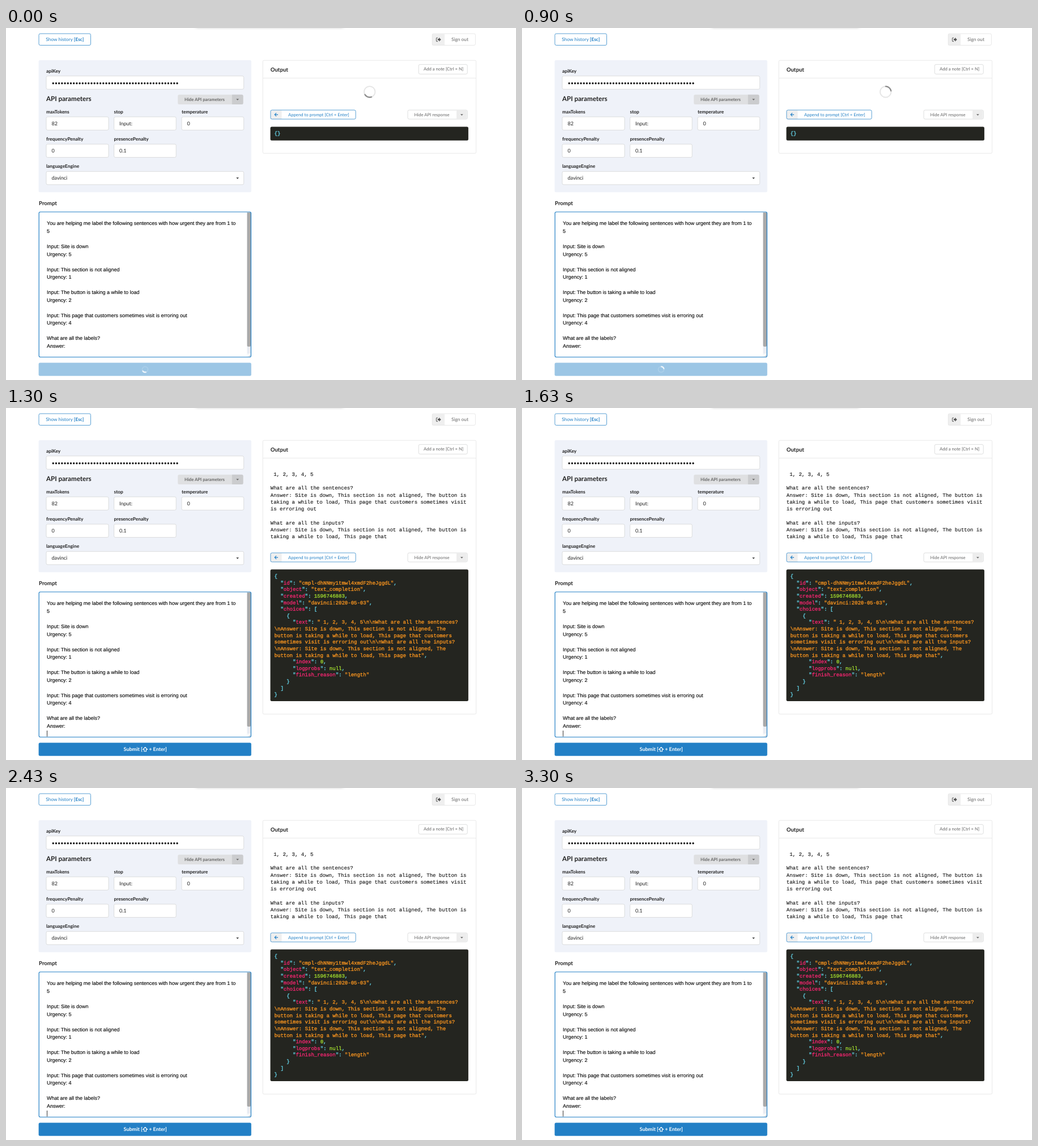
An HTML page that plays this animation: 900 by 622 pixels, repeating every 3370 ms.

```html
<!DOCTYPE html>
<html lang="en">
<head>
<meta charset="utf-8">
<title>Prompt playground</title>
<style>
  :root { --blue: #2380c6; --line: #d2d3d3; --loop: 3370ms; }
  html, body { margin: 0; width: 900px; height: 622px; overflow: hidden; background: #fff; }
  body { position: relative; text-rendering: geometricPrecision; }
  svg { position: absolute; left: 0; top: 0; }
  text { font: 9px Lato, sans-serif; fill: #212121; white-space: pre; }
  .bold { font-weight: 700; }
  .label text { font-size: 8.36px; font-weight: 700; }
  .head { font-size: 9.64px; font-weight: 700; }
  .small { font-size: 8.36px; }
  .tiny { font-size: 7.71px; }
  .grey { fill: #666; }
  .blue { fill: var(--blue); }
  .white { fill: #fff; }
  .box { fill: #fff; stroke: var(--line); stroke-width: .75; }
  .card { fill: none; stroke: #e2e3e3; stroke-width: .8; }
  .edge { fill: none; stroke: var(--blue); stroke-width: .75; }
  .dark { fill: #242520; }

  pre { position: absolute; margin: 0; -webkit-text-stroke: .12px currentColor; }
  #prompt { left: 72px; top: 339.4px; font: 9px/13.53px "Liberation Sans", Arial, sans-serif; color: #000; }
  #answer { left: 466.8px; top: 111.9px; font: 9px/12.28px "Liberation Mono", monospace; color: #111; }
  #json, #empty { left: 473.6px; font: 9px/11.61px "Liberation Mono", monospace; color: #66d9ef;
                  -webkit-text-stroke-width: .3px; }
  #json { top: 293.2px; }
  #empty { top: 182.3px; }
  #json b { font-weight: 400; color: #f92672; }
  #json i { font-style: normal; color: #fd971f; }
  #json u { text-decoration: none; color: #a6e22e; }

  .shade { position: absolute; left: 334px; top: -10px; width: 262px; height: 9px;
           border-radius: 4px; box-shadow: 0 0 5px rgba(0, 0, 0, .28); }

  .wait, .done, .bar, .submit, .caret { animation: var(--loop) step-end infinite; }
  .wait { animation-name: wait; }
  .done { animation-name: done; }
  .bar { animation-name: drop; }
  .submit { animation-name: wake; }
  .caret { animation-name: blink; }
  .spin { animation: spin var(--loop) infinite; }

  @keyframes wait { 0% { visibility: visible } 28.45%, to { visibility: hidden } }
  @keyframes done { 0% { visibility: hidden } 28.45%, to { visibility: visible } }
  @keyframes drop { 0% { transform: none } 28.45%, to { transform: translateY(111px) } }
  @keyframes wake { 0% { opacity: .45 } 28.45% { opacity: .83 } 30.5%, to { opacity: 1 } }
  @keyframes blink {
    0%, 19.5%, 49.2%, 78.9% { opacity: 0 }
    4.7%, 34.4%, 64%, 93.7%, to { opacity: 1 }
  }
  @keyframes spin {
    0% { transform: rotate(200deg); animation-timing-function: step-end }
    .89% { transform: rotate(240deg); animation-timing-function: steps(14) }
    28.585%, to { transform: rotate(800deg) }
  }
</style>
</head>
<body>
<svg width="900" height="622" viewBox="0 0 900 622">
  <defs>
    <path id="tri" d="M-2.4-1.1h4.8L0 1.4z"/>
  </defs>

  <!-- top bar -->
  <rect class="edge" x="58" y="10" width="91.5" height="20.5" rx="2.5"/>
  <text class="small blue" x="70.3" y="23.2">Show history <tspan class="bold">[Esc]</tspan></text>
  <path d="M752 10.5h22v20h-22z" fill="#efefef"/>
  <rect class="card" x="752.2" y="10" width="76.2" height="20.5" rx="2.5"/>
  <path d="M762 17.2h-1.6q-1 0-1 1v4.4q0 1 1 1h1.6" fill="none" stroke="#666" stroke-width="1.1"/>
  <path d="M761.8 19.1h2.3v-2.3l3.6 3.6-3.6 3.6v-2.3h-2.3z" fill="#555"/>
  <text class="small grey" x="786" y="23.2">Sign out</text>

  <!-- parameters -->
  <rect x="57.6" y="56.8" width="375.2" height="233.5" rx="2.5" fill="#eff2f9"/>
  <g class="label">
    <text x="71" y="78.8">apiKey</text>
    <text x="71" y="150.6">maxTokens</text>
    <text x="190.5" y="150.6">stop</text>
    <text x="310" y="150.6">temperature</text>
    <text x="71" y="198.9">frequencyPenalty</text>
    <text x="190.5" y="198.9">presencePenalty</text>
    <text x="71" y="247.1">languageEngine</text>
  </g>
  <text class="bold" x="71" y="129.4" style="font-size:11.57px">API parameters</text>
  <g class="box">
    <rect x="71" y="84.8" width="348.6" height="23.4" rx="2.5"/>
    <rect x="71" y="157" width="110" height="23.4" rx="2.5"/>
    <rect x="190.6" y="157" width="109.6" height="23.4" rx="2.5"/>
    <rect x="310" y="157" width="109.6" height="23.4" rx="2.5"/>
    <rect x="71" y="205.2" width="110" height="23.4" rx="2.5"/>
    <rect x="190.6" y="205.2" width="109.6" height="23.4" rx="2.5"/>
    <rect x="71" y="253.4" width="348.6" height="23.4" rx="2.5"/>
  </g>
  <path d="M83.2 97.8H303.5" stroke="#111" stroke-width="3.4" stroke-linecap="round" stroke-dasharray="0 5.21"/>
  <text x="80.5" y="172.2">82</text>
  <text x="200" y="172.2">Input:</text>
  <text x="319.5" y="172.2">0</text>
  <text x="80.5" y="220.4">0</text>
  <text x="200" y="220.4">0.1</text>
  <text x="80.5" y="268.4">davinci</text>
  <use href="#tri" x="408.6" y="265.4" fill="#333"/>
  <rect x="303.3" y="117.7" width="115.2" height="17.3" rx="2.5" fill="#dfe0e2"/>
  <path d="M398.8 117.7h17.2q2.5 0 2.5 2.5v12.3q0 2.5-2.5 2.5h-17.2z" fill="#cbccce"/>
  <text class="tiny bold grey" x="315" y="129">Hide API parameters</text>
  <use href="#tri" x="408.6" y="126.4" fill="#666"/>

  <!-- prompt -->
  <text class="head" x="58" y="313.2">Prompt</text>
  <path d="M425.5 326h6.5v255h-6.5z" fill="#e9ecf2"/>
  <path d="M425.5 326h6.5v235q0 2-2 2h-2.5q-2 0-2-2z" fill="#a9a9a9"/>
  <path d="M425.5 575.5h6.5v6h-6.5z" fill="#fafafa"/>
  <path d="M428.5 580.5l3-3M430.3 580.7l1.3-1.3" stroke="#999" stroke-width=".6"/>
  <rect class="edge" x="58.2" y="325" width="374.2" height="256.5" rx="2.5" style="stroke-width:1.2"/>
  <path class="caret" d="M72.5 570v10.5" stroke="#000" stroke-width=".8"/>

  <!-- submit -->
  <g class="submit">
    <rect class="blue" x="57.6" y="591.5" width="375.2" height="23.2" rx="2.5"/>
    <g class="done">
      <text class="bold white" x="240.8" y="606.3" text-anchor="end">Submit [</text>
      <path d="M245.6 599.3l4 4.1h-2.2v3.3h-3.6v-3.3h-2.2z" fill="none" stroke="#fff" stroke-width="1.1" stroke-linejoin="round"/>
      <text class="bold white" x="252.2" y="606.3">+ Enter]</text>
    </g>
    <g class="wait" transform="translate(245.5 603.3)" fill="none" stroke="#fff" stroke-width="1.8">
      <circle r="5" stroke-opacity=".15"/>
      <circle class="spin" r="5" pathLength="8" stroke-dasharray="2 6" stroke-dashoffset="-5"/>
    </g>
  </g>

  <!-- output -->
  <rect class="card wait" x="453.2" y="57.2" width="376.4" height="164.2" rx="2"/>
  <rect class="card done" x="453.2" y="57.2" width="376.4" height="483.7" rx="2"/>
  <path class="card" d="M453.5 88.6h376"/>
  <text class="head" x="466.7" y="76.5">Output</text>
  <rect class="box" x="728.2" y="64.4" width="86" height="17" rx="2.5"/>
  <text class="tiny grey" x="737" y="75.4">Add a note [Ctrl + N]</text>

  <g class="wait">
    <g transform="translate(641.7 112.8)" fill="none" stroke-width="1.8">
      <circle r="9.7" stroke="#e5e5e5"/>
      <circle class="spin" r="9.7" stroke="#767676" pathLength="8" stroke-dasharray="2 6" stroke-dashoffset="-5"/>
    </g>
    <rect class="dark" x="466.5" y="174.4" width="349.4" height="24.3" rx="2.5"/>
  </g>
  <rect class="dark done" x="466.5" y="285.2" width="349.4" height="232.7" rx="2.5"/>

  <g class="bar">
    <path d="M467 145.5h19.5v15.5h-19.5z" fill="#efefef"/>
    <rect class="edge" x="466.9" y="145" width="150.2" height="16" rx="2.5"/>
    <path d="M480 153.1h-5.8m2.9-3l-3 3 3 3" fill="none" stroke="#2380c6" stroke-width="1.1"/>
    <text class="tiny blue" x="498" y="155.9">Append to prompt [Ctrl + Enter]</text>
    <rect class="box" x="709" y="145" width="105.3" height="16" rx="2.5"/>
    <path d="M795 145.4h18.5v15.3h-18.5z" fill="#ededed"/>
    <text class="tiny grey" x="720.5" y="155.9">Hide API response</text>
    <use href="#tri" x="804.3" y="153.3" fill="#666"/>
  </g>
</svg>

<pre id="prompt">You are helping me label the following sentences with how urgent they are from 1 to
5

Input: Site is down
Urgency: 5

Input: This section is not aligned
Urgency: 1

Input: The button is taking a while to load
Urgency: 2

Input: This page that customers sometimes visit is erroring out
Urgency: 4

What are all the labels?
Answer:</pre>

<pre id="empty" class="wait">{}</pre>

<pre id="answer" class="done"> 1, 2, 3, 4, 5

What are all the sentences?
Answer: Site is down, This section is not aligned, The button is
taking a while to load, This page that customers sometimes visit
is erroring out

What are all the inputs?
Answer: Site is down, This section is not aligned, The button is
taking a while to load, This page that</pre>

<pre id="json" class="done">{
  "<b>id</b>": <i>"cmpl-dhNNmy1tmwl4xmdF2heJggdL"</i>,
  "<b>object</b>": <i>"text_completion"</i>,
  "<b>created</b>": <u>1596746883</u>,
  "<b>model</b>": <i>"davinci:2020-05-03"</i>,
  "<b>choices</b>": [
    {
      "<b>text</b>": <i>" 1, 2, 3, 4, 5\n\nWhat are all the sentences?
\nAnswer: Site is down, This section is not aligned, The
button is taking a while to load, This page that customers
sometimes visit is erroring out\n\nWhat are all the inputs?
\nAnswer: Site is down, This section is not aligned, The
button is taking a while to load, This page that"</i>,
      "<b>index</b>": <u>0</u>,
      "<b>logprobs</b>": <u>null</u>,
      "<b>finish_reason</b>": <i>"length"</i>
    }
  ]
}</pre>

<div class="shade"></div>
</body>
</html>
```
